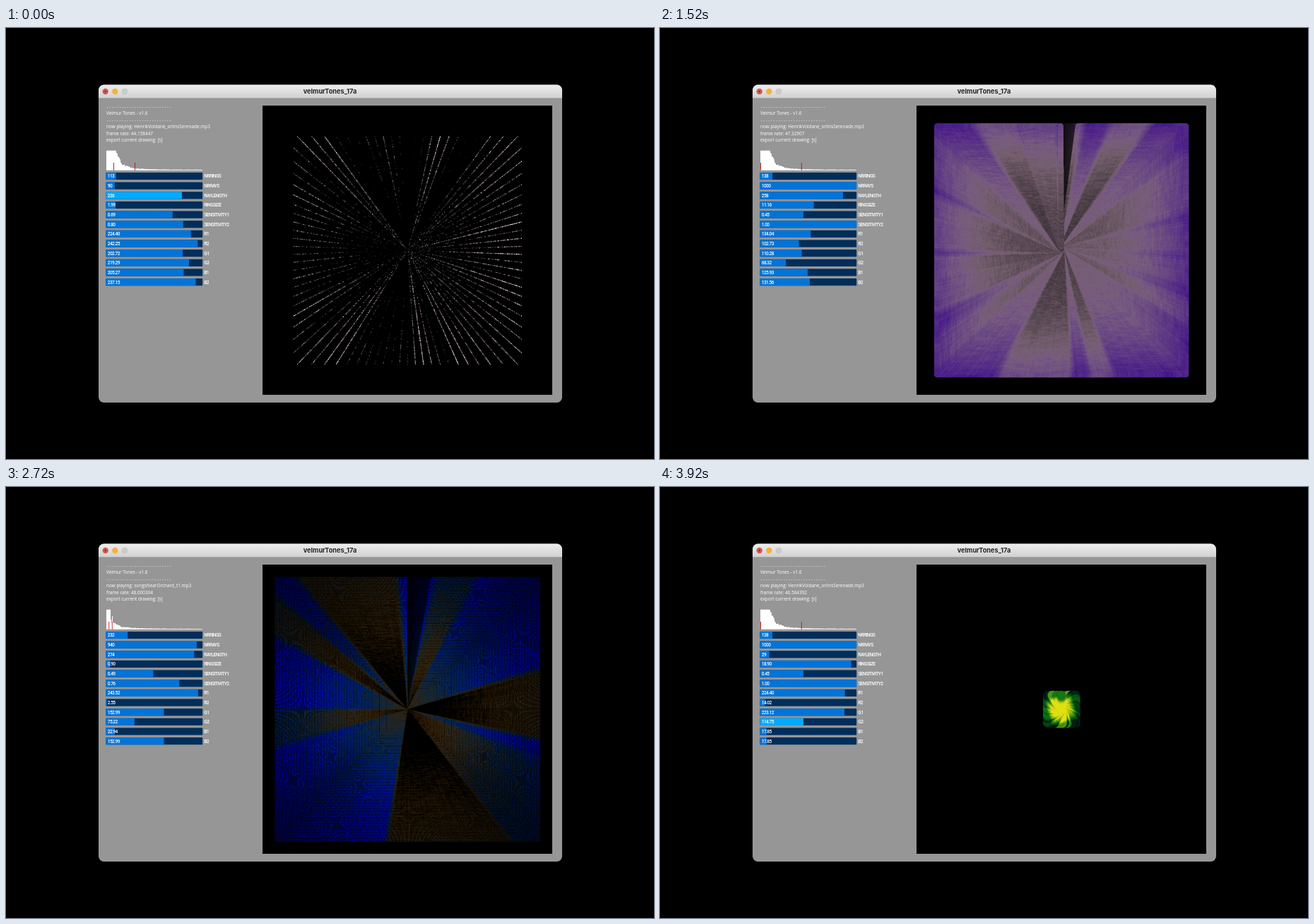
Animation, 917 px wide and 611 px high, one loop 4.2 s. Source, as an HTML page with a canvas:

```html
<!DOCTYPE html>
<html lang="en">
<head>
<meta charset="utf-8">
<title>velmurTones_17a</title>
<style>
  html, body { margin: 0; width: 100%; height: 100%; overflow: hidden; background: #000; }
  svg, canvas { position: absolute; left: 0; top: 0; }
  canvas { left: 363px; top: 110px; }
  text { fill: #fff; }
  .title { font: 700 9.2px Inter, sans-serif; fill: #262626; text-anchor: middle; }
  .info { font: 6.45px "Open Sans", sans-serif; }
  .dash { font: 5.9px "DejaVu Sans Mono", monospace; }
  .tiny { font: 500 6.6px Roboto, sans-serif; letter-spacing: -.55px; }
</style>
</head>
<body>
<svg id="ui" width="917" height="611" viewBox="0 0 917 611">
  <defs>
    <linearGradient id="bar" x2="0" y2="1">
      <stop offset="0" stop-color="#ededed"/><stop offset="1" stop-color="#d1d1d1"/>
    </linearGradient>
  </defs>
  <rect x="131" y="80.6" width="656" height="450.4" rx="7.5" fill="#969696"/>
  <path d="M131 99.2V88.1a7.5 7.5 0 0 1 7.5-7.5h641a7.5 7.5 0 0 1 7.5 7.5v11.1z" fill="url(#bar)"/>
  <circle cx="140.7" cy="90" r="4.2" fill="#cf5b52"/>
  <circle cx="140.7" cy="90" r="1.2" fill="#8c2a24"/>
  <circle cx="154.3" cy="90" r="4.2" fill="#f3b23e"/>
  <circle cx="168" cy="90" r="4" fill="#cbcbcb" stroke="#bdbdbd" stroke-width=".5"/>
  <text class="title" x="458.5" y="93.3">velmurTones_17a</text>
</svg>
<canvas id="art" width="410" height="410"></canvas>
<script>
const LOOP = 4200;
const ui = document.getElementById('ui');
const art = document.getElementById('art').getContext('2d');

// Wedges of loud passages: centre angle, half width (degrees), strength.
const songs = {
  serenade: {
    file: 'HenrikVoldane_orlinsSerenade.mp3', mark: '#b8231f',
    wedges: [[334, 8, 1], [350, 9, .75], [5, 6, 1], [29, 7, 1], [63, 11, .5], [85, 8, .35], [101, 6, .3],
      [117, 5, .4], [163, 5, .8], [192, 16, .95], [232, 5, .4], [252, 8, .6], [263, 6, .75], [283, 12, .7], [305, 8, .5]],
    level: x => x < 11 ? 28 : 26 * Math.exp((11 - x) / 8) + 3 * Math.exp((11 - x) / 40) + .7
  },
  orchard: {
    file: 'songsNearOrchard_t1.mp3', mark: '#cf3327',
    wedges: [[338, 18, .9], [20, 8, .5], [88, 15, .95], [130, 20, .4], [165, 24, 1], [262, 8, .5], [305, 6, .7]],
    level: x => x < 6 ? 28 : x === 8 ? 18 : 9 * Math.exp((6 - x) / 9) + 2 * Math.exp((6 - x) / 50) + .6
  },
  fawn: {
    file: 'brimFawn.mp3', mark: '#262030',
    wedges: [[8, 12, 1], [335, 12, .8], [35, 9, .8], [75, 3, .3], [140, 18, .5], [215, 14, .8], [255, 6, .4], [300, 8, .4]],
    level: x => x < 20 ? 25 : 8 * Math.exp((20 - x) / 25) + 2.5 * Math.exp(-(((x - 53) / 14) ** 2)) + .4
  }
};

const labels = ['NRRINGS', 'NRRAYS', 'RAYLENGTH', 'RINGSIZE', 'SENSITIVITY1', 'SENSITIVITY2',
  'R1', 'R2', 'G1', 'G2', 'B1', 'B2'];
const lows = [10];
const highs = [1000, 1000, 300, 20, 1, 1];

// look: base, rise, power, wedge depth, noise, light, light gain, lead-in angle, glow
const keys = [
  { at: 0, song: 'serenade', rate: 44.158447, marks: [152.5, 182.5], hot: 2, tint: [0, 0],
    vals: [113, 90, 236, 1.99, .69, .8, 224.4, 242.25, 202.72, 219.29, 205.27, 237.15],
    look: [.1, 1, .8, .8, 1.7, -.25, .95, 10, 0] },
  { at: 600, song: 'orchard', rate: 48.422028, marks: [144.5, 160.7], tint: [0, 0],
    vals: [10, 900, 215, 20, .65, .96, 221.85, 167.02, 118.57, 158.1, 87.97, 151.72],
    look: [.45, 3.1, 4, .7, 1.3, 1, 0, 9, 0] },
  { at: 1200, song: 'serenade', rate: 48.87409, marks: [142.5, 200.3], tint: [0, 0],
    vals: [138, 1000, 214, 3.1, .45, 1, 40, 195.07, 30, 20, 238.42, 21.67],
    look: [.35, 1.5, 2.5, 1.1, .9, .7, .8, 11, 0] },
  { at: 1800, song: 'serenade', rate: 45.84463, marks: [142.5, 200.3], tint: [0, 0],
    vals: [138, 1000, 300, 18.9, .45, 1, 224.4, 14.02, 187.42, 114.75, 17.85, 237.15],
    look: [.1, 1.75, 2.5, 1, 1, 1, 0, 4, 0] },
  { at: 2720, song: 'orchard', rate: 48.600304, marks: [145.7, 150.3], tint: [0, 0],
    vals: [232, 940, 274, .9, .49, .76, 243.52, 2.55, 152.99, 75.22, 22.94, 152.99],
    look: [.1, 1.9, .6, 1.8, 1.2, .18, .3, 10, 0] },
  { at: 3600, song: 'fawn', rate: 46.88821, marks: [155.5, 221.7], tint: [30, 140],
    vals: [544, 300, 241, 2.2, .7, 1, 40, 90, 30, 182.32, 100, 100],
    look: [.35, 1.2, 7, .6, 1.2, .3, .8, 16, .7] },
  { at: 3920, song: 'serenade', rate: 46.564392, marks: [142.5, 200.3], hot: 9, tint: [0, 0],
    vals: [138, 1000, 29, 18.9, .45, 1, 224.4, 14.02, 223.12, 114.75, 17.85, 17.85],
    look: [.1, 1.7, 2.4, 1.1, .6, 1, 0, 4, 0] }
];
// In-between settings: time, index of the preceding key, blend towards the next.
const blends = [[320, 0, .8], [920, 1, .5], [1520, 2, .51], [2120, 3, .35], [2400, 3, .9], [3000, 4, .4], [3320, 4, .9]];

const clamp = (v, lo = 0, hi = 1) => Math.min(hi, Math.max(lo, v));
const mix = (a, b, w) => Array.isArray(a) ? a.map((v, i) => mix(v, b[i], w)) : a + (b - a) * w;

function blend([at, i, w]) {
  const a = keys[i], b = keys[i + 1];
  const s = { at, song: (w > .7 ? b : a).song, rate: +mix(a.rate, b.rate, w).toFixed(5) };
  for (const k of ['marks', 'tint', 'vals', 'look']) s[k] = mix(a[k], b[k], w);
  for (let k = 0; k < 3; k++) s.vals[k] = Math.round(s.vals[k]);
  return s;
}
const scenes = [...keys, ...blends.map(blend)].sort((a, b) => a.at - b.at);

function rnd(a, b) {
  let n = Math.imul(a + 11, 374761393) ^ Math.imul(b + 5, 668265263);
  n = Math.imul(n ^ n >>> 13, 1274126177);
  return ((n ^ n >>> 16) >>> 0) / 4294967296;
}
function smooth(row, x) {
  const i = Math.floor(x), f = x - i;
  return mix(rnd(row, i), rnd(row, i + 1), f * f * (3 - 2 * f));
}

// Discs are filled at double size, then scaled down.
const N = 820, UNIT = 410 / 600 * 2, MID = 410.4;
const big = document.createElement('canvas');
big.width = big.height = N;
const bigCtx = big.getContext('2d');
const image = bigCtx.createImageData(N, N);
const px = new Uint32Array(image.data.buffer);

function disc(x, y, r, color) {
  const end = Math.min(N, Math.round(y + r));
  for (let j = Math.max(0, Math.round(y - r)); j < end; j++) {
    const dy = j + .5 - y, h = Math.sqrt(Math.max(0, r * r - dy * dy));
    px.fill(color, j * N + Math.max(0, Math.round(x - h)), j * N + Math.min(N, Math.round(x + h)));
  }
}

function wedgeAt(wedges, deg) {
  let w = 0;
  for (const [mid, half, force] of wedges) {
    const d = Math.abs((deg - mid + 540) % 360 - 180);
    w = Math.max(w, force * clamp((half + 1.5 - d) / 3));
  }
  return w;
}

function paint({ song, vals, look, tint }) {
  const [rings, rays, length, size, , , r1, r2, g1, g2, b1, b2] = vals;
  const [base, rise, power, depth, noise, light, gain, lead, glow] = look;
  const blue1 = b1 + tint[0], blue2 = b2 + tint[1];
  const radius = Math.max(.8, size * UNIT / 2);
  px.fill(0xff000000);
  for (let i = 0; i < rays; i++) {
    const deg = 360 * i / rays, a = deg * Math.PI / 180;
    const sx = Math.sin(a), sy = -Math.cos(a);
    const reach = length * UNIT / Math.max(Math.abs(sx), Math.abs(sy));
    const w = wedgeAt(songs[song].wedges, deg), ray = rnd(i, 977);
    const fade = deg < lead ? .08 + .25 * deg / lead : 1;
    const shine = glow * Math.cos(2 * a) ** 2 * (1 - w);
    for (let j = 1; j <= rings; j++) {
      const p = j / rings;
      const n = .45 * smooth(j, deg / 4) + .25 * ray + .3 * rnd(i, j) - .5;
      let t = base + rise * p ** power - depth * w + noise * n;
      if (glow) t += shine * Math.exp(-(((p - .42) / .16) ** 2));
      const b = clamp(light + gain * t) * fade;
      if (b < .02) continue;
      t = clamp(t, 0, 2.6);
      const tone = (u, v) => clamp(u + (v - u) * t, 0, 255) * b | 0;
      disc(MID + sx * reach * p, MID + sy * reach * p, radius,
        (0xff000000 | tone(blue1, blue2) << 16 | tone(g1, g2) << 8 | tone(r1, r2)) >>> 0);
    }
  }
  bigCtx.putImageData(image, 0, 0);
  const out = document.createElement('canvas');
  out.width = out.height = 410;
  out.getContext('2d').drawImage(big, 0, 0, 410, 410);
  return out;
}

function add(tag, attrs, text = '') {
  const el = document.createElementNS('http://www.w3.org/2000/svg', tag);
  for (const k in attrs) el.setAttribute(k, attrs[k]);
  el.textContent = text;
  ui.append(el);
  return el;
}
const line = (row, text, cls = 'info') => add('text', { class: cls, x: 142, y: 113.6 + row * 9.56 }, text);

const dashes = '-'.repeat(26);
line(0, dashes, 'dash');
line(1, 'Velmur Tones - v1.6');
line(2, dashes, 'dash');
const playing = line(3), rate = line(4);
line(5, 'export current drawing: [s]');
const spectrum = add('path', { fill: '#fff' });
const marks = [0, 1].map(() => add('rect', { y: 191, width: 1, height: 10.8 }));
const sliders = labels.map((name, i) => {
  const y = 204.9 + i * 13.65, box = { x: 141.5, y, width: 136.6, height: 10.2 };
  add('rect', { ...box, fill: '#002d5a' });
  const fill = add('rect', box);
  const value = add('text', { class: 'tiny', x: 143.7, y: y + 7.5 });
  add('text', { class: 'tiny', x: 280.2, y: y + 7.5 }, name);
  return { fill, value };
});

function spectrumPath(song) {
  let d = 'M142 201.8';
  for (let x = 0; x < 136; x++) {
    const v = songs[song].level(x);
    const h = v === 28 ? v : Math.min(28, v * (.8 + .45 * rnd(x, 31)));
    d += `V${(201.8 - h).toFixed(1)}h1`;
  }
  return d + 'V201.8z';
}

function show(s) {
  const song = songs[s.song];
  playing.textContent = 'now playing: ' + song.file;
  rate.textContent = 'frame rate: ' + s.rate;
  spectrum.setAttribute('d', spectrumPath(s.song));
  marks.forEach((m, i) => {
    m.setAttribute('x', s.marks[i] - .5);
    m.setAttribute('fill', song.mark);
  });
  sliders.forEach(({ fill, value }, i) => {
    const v = s.vals[i], lo = lows[i] || 0, hi = highs[i] || 255;
    fill.setAttribute('width', 136.6 * clamp((v - lo) / (hi - lo)));
    fill.setAttribute('fill', s.hot === i ? '#00aaff' : '#0074d9');
    value.textContent = v.toFixed(i < 3 ? 0 : 2);
  });
  art.drawImage(s.picture, 0, 0);
}

for (const s of scenes) s.picture = paint(s);

let current;
const start = performance.now();
function tick() {
  const t = (performance.now() - start) % LOOP;
  const s = scenes.findLast(k => k.at <= t) || scenes[0];
  if (s !== current) show(current = s);
  requestAnimationFrame(tick);
}
tick();
</script>
</body>
</html>
```
